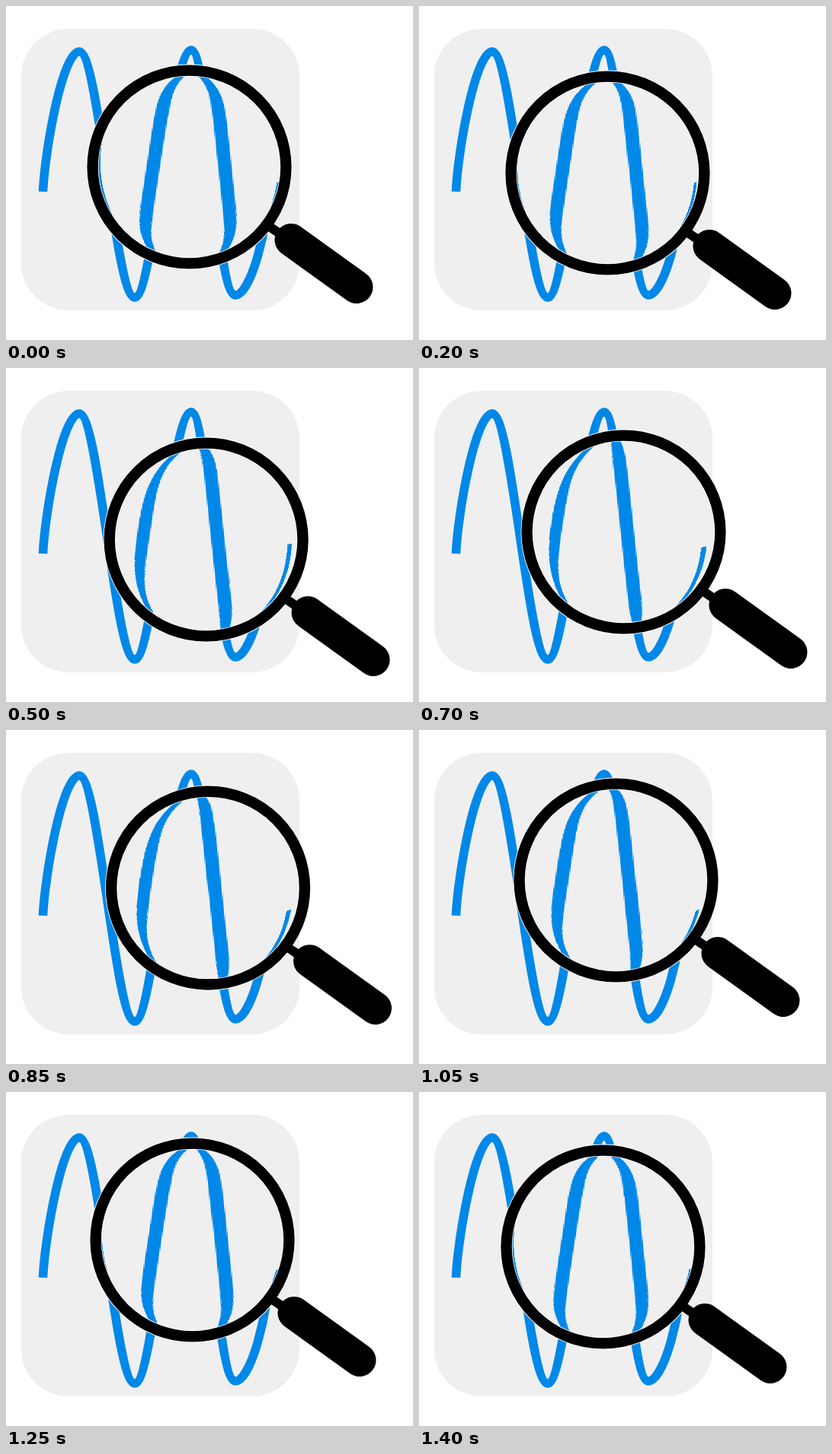
Write an HTML page with a canvas that moves like this. It is 534x439 px and loops after 1.45 s.

```html
<!DOCTYPE html>
<html>
<head>
<meta charset="utf-8">
<style>
  html, body { margin: 0; width: 100%; height: 100%; overflow: hidden; background: #fff; }
  canvas { display: block; }
</style>
</head>
<body>
<canvas id="stage" width="534" height="439"></canvas>
<script>
const W = 534, H = 439, LOOP = 1450, STEP = 50;
const LENS = { radius: 120, reach: 121, zoom: 0.66, power: 12, shiftX: -2, shiftY: -4 };

// Lens centre over time: [ms, x, y]
const PATH = [
  [0, 240.5, 211.5], [200, 247.5, 219.5], [380, 256, 226.8], [500, 262.6, 225.5],
  [550, 265.1, 224], [700, 268.5, 215.5], [1050, 258.5, 197.5],
  [1100, 256.5, 195.5], [1250, 244.5, 194.5], [1400, 241.5, 203.5]
];

const ctx = document.getElementById('stage').getContext('2d');

function makeCanvas(w, h) {
  const canvas = document.createElement('canvas');
  canvas.width = w;
  canvas.height = h;
  return canvas;
}

const scene = makeCanvas(W, H);
const sceneCtx = scene.getContext('2d');
sceneCtx.fillStyle = '#fff';
sceneCtx.fillRect(0, 0, W, H);
sceneCtx.fillStyle = '#efefef';
sceneCtx.beginPath();
sceneCtx.roundRect(20, 30, 365, 370, 62);
sceneCtx.fill();
sceneCtx.strokeStyle = '#0088e8';
sceneCtx.lineWidth = 11.6;
sceneCtx.stroke(new Path2D(
  'M48.5 244C51 190 74 60 96 60C122 60 143 383 169 383' +
  'C193 383 217 58 243 58C265 58 275 380 301 380C320 380 345 296 345 226'));
const pixels = new Uint32Array(sceneCtx.getImageData(0, 0, W, H).data.buffer);

const SIZE = 2 * LENS.radius + 4;
const glass = makeCanvas(SIZE, SIZE);
const glassCtx = glass.getContext('2d');
const glassImage = glassCtx.createImageData(SIZE, SIZE);
const glassPixels = new Uint32Array(glassImage.data.buffer);

// Cubic interpolation with tangents taken from the neighbouring points
function lensCentre(t) {
  let i = 0;
  while (i < PATH.length - 2 && PATH[i + 1][0] < t) i++;
  const a = PATH[i], b = PATH[i + 1];
  const before = PATH[Math.max(i - 1, 0)];
  const after = PATH[Math.min(i + 2, PATH.length - 1)];
  const span = b[0] - a[0], u = (t - a[0]) / span, v = 1 - u;
  return [1, 2].map(k => {
    const m0 = (b[k] - before[k]) / (b[0] - before[0]) * span;
    const m1 = (after[k] - a[k]) / (after[0] - a[0]) * span;
    return a[k] * v * v * (1 + 2 * u) + b[k] * u * u * (3 - 2 * u)
      + m0 * u * v * v - m1 * u * u * v;
  });
}

// Magnifies the middle and squeezes the picture back to true size at the rim
function fillGlass(cx, cy) {
  const left = Math.round(cx) - SIZE / 2, top = Math.round(cy) - SIZE / 2;
  for (let j = 0; j < SIZE; j++) {
    for (let i = 0; i < SIZE; i++) {
      const dx = left + i + 0.5 - cx, dy = top + j + 0.5 - cy;
      const r = Math.min(1, Math.hypot(dx, dy) / LENS.reach);
      const scale = LENS.zoom + (1 - LENS.zoom) * r ** LENS.power;
      const x = Math.floor(cx + LENS.shiftX + dx * scale);
      const y = Math.floor(cy + LENS.shiftY + dy * scale);
      glassPixels[j * SIZE + i] = pixels[y * W + x];
    }
  }
  glassCtx.putImageData(glassImage, 0, 0);
  ctx.save();
  ctx.beginPath();
  ctx.arc(cx, cy, LENS.radius + 1, 0, 2 * Math.PI);
  ctx.clip();
  ctx.drawImage(glass, left, top);
  ctx.restore();
}

function ring(cx, cy, width, color) {
  ctx.strokeStyle = color;
  ctx.lineWidth = width;
  ctx.beginPath();
  ctx.arc(cx, cy, 126.9, 0, 2 * Math.PI);
  ctx.stroke();
}

function bar(x1, y1, x2, y2, width, cap) {
  ctx.lineWidth = width;
  ctx.lineCap = cap;
  ctx.beginPath();
  ctx.moveTo(x1, y1);
  ctx.lineTo(x2, y2);
  ctx.stroke();
}

function draw(t) {
  const [cx, cy] = lensCentre(t);
  ctx.drawImage(scene, 0, 0);
  fillGlass(cx, cy);
  ring(cx, cy, 16, '#fff');
  ring(cx, cy, 14.4, '#000');
  bar(cx + 101, cy + 75.5, cx + 133.5, cy + 98, 12, 'butt');
  bar(cx + 133.5, cy + 96, cx + 219.5, cy + 158, 43, 'round');
}

let shown = -1;
function tick() {
  const t = Math.floor(performance.now() % LOOP / STEP) * STEP;
  if (t !== shown) draw(shown = t);
  requestAnimationFrame(tick);
}
tick();
</script>
</body>
</html>
```
